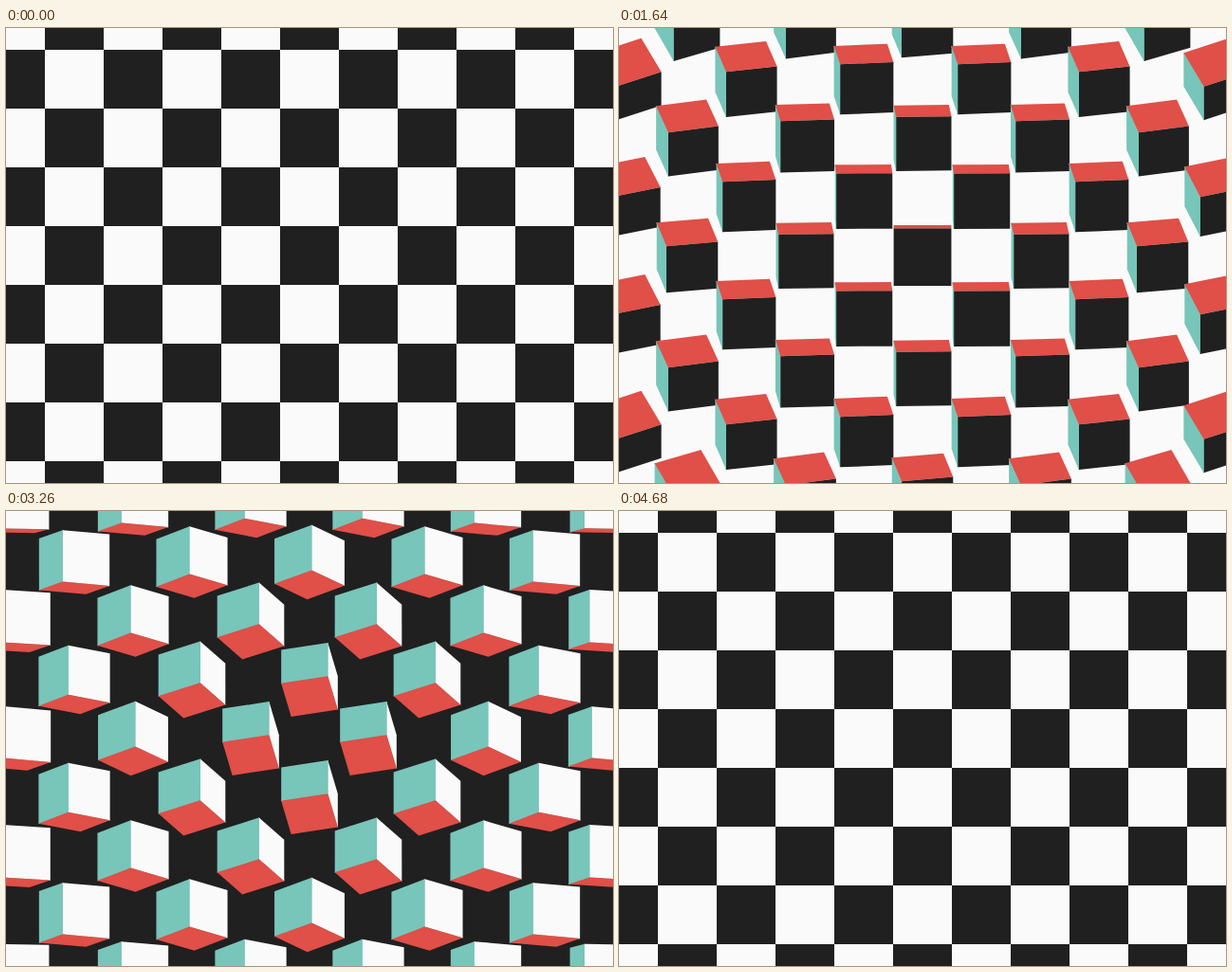
These frames come from a looping animation (640x480 px, 4.8 s). An HTML page:

```html
<!DOCTYPE html>
<html lang="en">
<head>
<meta charset="utf-8">
<title>Turning cubes</title>
<style>
  html, body { margin: 0; width: 100%; height: 100%; overflow: hidden; background: #fafafa; }
  svg { display: block; width: 640px; height: 480px; }
</style>
</head>
<body>
<svg id="stage" viewBox="0 0 640 480"></svg>
<script>
const DARK = '#202020', LIGHT = '#fafafa', TEAL = '#78c5b9', RED = '#e04f48';
const CELL = 62, HALF = 2400, STEP = 20;
const BEGIN = 20;     // rest before the first cube moves
const RIPPLE = 74;    // delay per cell of distance from the centre
const TURN = 1635;    // length of each half turn
const LAG = 165;      // the pitch follows the yaw
const SHRINK = 0.2;

const stage = document.getElementById('stage');

function add(parent, name, attrs) {
  const el = document.createElementNS('http://www.w3.org/2000/svg', name);
  for (const key in attrs) el.setAttribute(key, attrs[key]);
  return parent.appendChild(el);
}

const clamp = x => Math.min(1, Math.max(0, x));

function ease(x) {
  const p = clamp(x), g = 2.2;
  return p < 0.5 ? 0.5 * (2 * p) ** g : 1 - 0.5 * (2 - 2 * p) ** g;
}

const back = add(stage, 'rect', { width: 640, height: 480 });
const cubes = [];
for (let j = -4; j <= 4; j++) {
  for (let i = -5; i <= 5; i++) {
    const odd = (i + j) & 1;
    const group = add(stage, 'g', {
      transform: `translate(${320 + i * CELL} ${240 + j * CELL})`
    });
    const seam = add(group, 'path', { stroke: TEAL, fill: 'none' });
    const faces = [odd ? LIGHT : DARK, TEAL, RED].map(fill => add(group, 'path', { fill }));
    cubes.push({ odd, group, seam, faces, delay: BEGIN + RIPPLE * Math.hypot(i, j) });
  }
}

// Directions of the front, left and bottom faces, flipped toward the viewer
function axes(yaw, pitch) {
  const sy = Math.sin(yaw), cy = Math.cos(yaw);
  const sp = Math.sin(pitch), cp = Math.cos(pitch);
  return [
    [sy, -cy * sp, cy * cp],
    [-cy, -sy * sp, sy * cp],
    [0, cp, sp]
  ].map(a => a[2] < 0 ? a.map(x => -x) : a);
}

const point = p => p[0].toFixed(3) + ' ' + p[1].toFixed(3);
const minus = (p, q) => [p[0] - q[0], p[1] - q[1]];

function drawCube(cube, time) {
  const t = time - cube.delay;
  const yaw = Math.PI * ease(t / TURN);
  const pitch = Math.PI * ease((t - LAG) / TURN);
  const swell = Math.sin(Math.PI * clamp(t / (TURN + LAG))) ** 2;
  const size = CELL * (1 - SHRINK * swell);

  const edges = axes(yaw, pitch).map(a => a.map(x => x * size));
  const near = [0, 1].map(k => (edges[0][k] + edges[1][k] + edges[2][k]) / 2);

  cube.faces.forEach((face, k) => {
    const u = edges[(k + 1) % 3], v = edges[(k + 2) % 3];
    const a = minus(near, u), b = minus(near, v);
    face.setAttribute('d', 'M' + [near, a, minus(a, v), b].map(point).join('L') + 'Z');
  });

  // thin underlay that keeps the background from showing between faces
  const thin = Math.min(1, ...edges.map(e => e[2]));
  cube.seam.setAttribute('stroke-width', thin.toFixed(3));
  cube.seam.setAttribute('d',
    edges.map(e => 'M' + point(near) + 'L' + point(minus(near, e))).join(''));
}

function draw(ms) {
  const time = Math.floor(ms / STEP) * STEP % (2 * HALF);
  const second = time >= HALF ? 1 : 0;
  back.setAttribute('fill', second ? DARK : LIGHT);
  for (const cube of cubes) {
    const shown = cube.odd === second;
    cube.group.setAttribute('display', shown ? 'inline' : 'none');
    if (shown) drawCube(cube, time - second * HALF);
  }
}

const start = performance.now();
function tick() {
  draw(performance.now() - start);
  requestAnimationFrame(tick);
}
tick();
</script>
</body>
</html>
```
